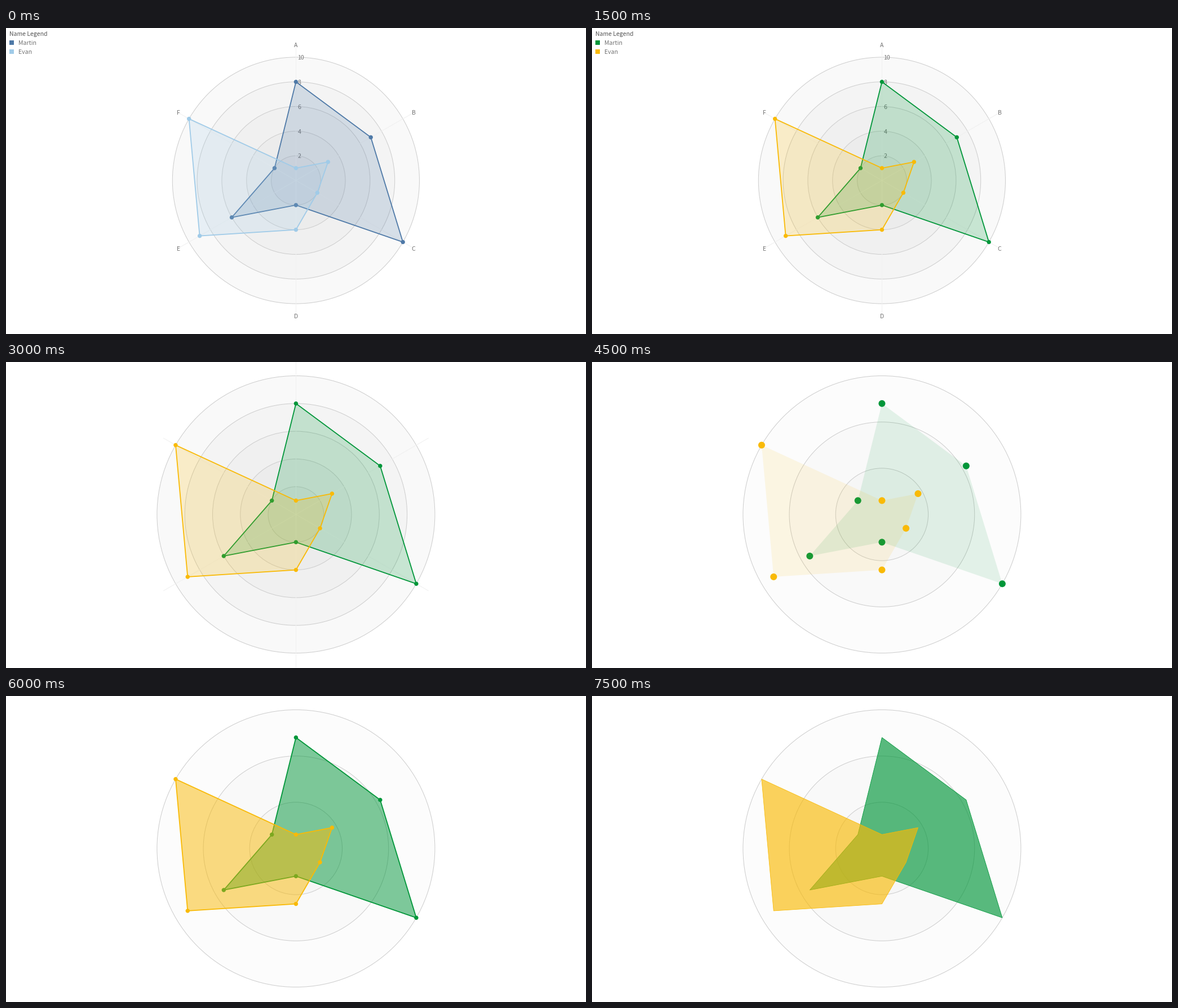
Animation of 1029x544 px, one loop 9 s. Source, as a matplotlib script:

```python
import numpy as np
import matplotlib.pyplot as plt
from matplotlib.animation import FuncAnimation
from matplotlib.colors import to_rgba
from matplotlib.patches import Circle, Polygon, Rectangle

W, H, DPI = 1029, 544, 64
PT = 72 / DPI  # points per pixel
CX, CY = 514.4, 271
MAX = 10
FONT = "Noto Sans CJK JP"
GREY, TITLE, RING, SPOKE = "#737373", "#555555", "#cdcdcd", "#f0f0f0"

AXES = "ABCDEF"
SERIES = {
    "Martin": [8, 7, 10, 2, 6, 2],
    "Evan": [1, 3, 2, 4, 9, 10],
}
BLUES = ("#4e79a7", "#a0cbe8")
BRIGHTS = ("#009639", "#f9ba06")


def style(colors=BRIGHTS, radius=246.5, text=False, rings=5, ring_alpha=0.1,
          spokes=True, fill=0.2, line=1.8, dot=3.7):
    return dict(colors=colors, radius=radius, text=text, rings=rings,
                ring_alpha=ring_alpha, spokes=spokes, fill=fill,
                line=line, dot=dot)


SPARSE = dict(rings=3, ring_alpha=0.05, spokes=False)
STEPS = [
    style(colors=BLUES, radius=219.1, text=True),
    style(radius=219.1, text=True),
    style(),
    style(fill=0.1, line=0, dot=6, **SPARSE),
    style(fill=0.5, **SPARSE),
    style(fill=0.65, line=0.8, dot=0, **SPARSE),
]

fig = plt.figure(figsize=(W / DPI, H / DPI), dpi=DPI, facecolor="white")
ax = fig.add_axes([0, 0, 1, 1])


def spoke_points(dist):
    angle = np.arange(len(AXES)) * 2 * np.pi / len(AXES)
    dist = np.asarray(dist)
    return np.column_stack([CX + dist * np.sin(angle),
                            CY - dist * np.cos(angle)])


def label(x, y, text, color=GREY, ha="left"):
    ax.text(x, y, text, color=color, ha=ha, va="baseline",
            family=FONT, size=10.5 * PT, zorder=2)


def add(patch):
    patch.set_zorder(2)
    ax.add_patch(patch)


def draw_grid(s):
    radius = s["radius"]
    for k in range(s["rings"], 0, -1):
        add(Circle((CX, CY), radius * k / s["rings"], lw=PT,
                   fc=to_rgba(RING, s["ring_alpha"]), ec=RING))
    if s["spokes"]:
        for x, y in spoke_points(np.full(len(AXES), 1.1 * radius)):
            ax.plot([CX, x], [CY, y], color=SPOKE, lw=PT, zorder=2)


def draw_text(s):
    radius, rings = s["radius"], s["rings"]
    for k in range(1, rings + 1):
        label(CX + 3, CY - radius * k / rings + 4.2, str(MAX * k // rings))
    ends = spoke_points(np.full(len(AXES), 1.1 * radius))
    for name, (x, y) in zip(AXES, ends):
        label(x, y + 4, name, ha="center")
    label(5.5, 13.6, "Name Legend", TITLE)
    for i, (name, color) in enumerate(zip(SERIES, s["colors"])):
        top = 22 + 16.5 * i
        add(Rectangle((6, round(top)), 8, 8, fc=color, ec="none"))
        label(22, top + 7.7, name)


def draw_series(s):
    for values, color in zip(SERIES.values(), s["colors"]):
        points = spoke_points(np.array(values) * s["radius"] / MAX)
        add(Polygon(points, fc=to_rgba(color, s["fill"]), ec="none"))
        if s["line"]:
            add(Polygon(points, fill=False, ec=color, lw=s["line"] * PT,
                        joinstyle="miter"))
        if s["dot"]:
            for point in points:
                add(Circle(point, s["dot"], fc=color, ec="none"))


def draw(i):
    s = STEPS[i]
    ax.cla()
    ax.axis("off")
    draw_grid(s)
    if s["text"]:
        draw_text(s)
    draw_series(s)
    ax.set_xlim(0, W)
    ax.set_ylim(H, 0)
    return []


anim = FuncAnimation(fig, draw, frames=len(STEPS), interval=1500,
                     repeat=True, repeat_delay=0, blit=False)
plt.show()
```
